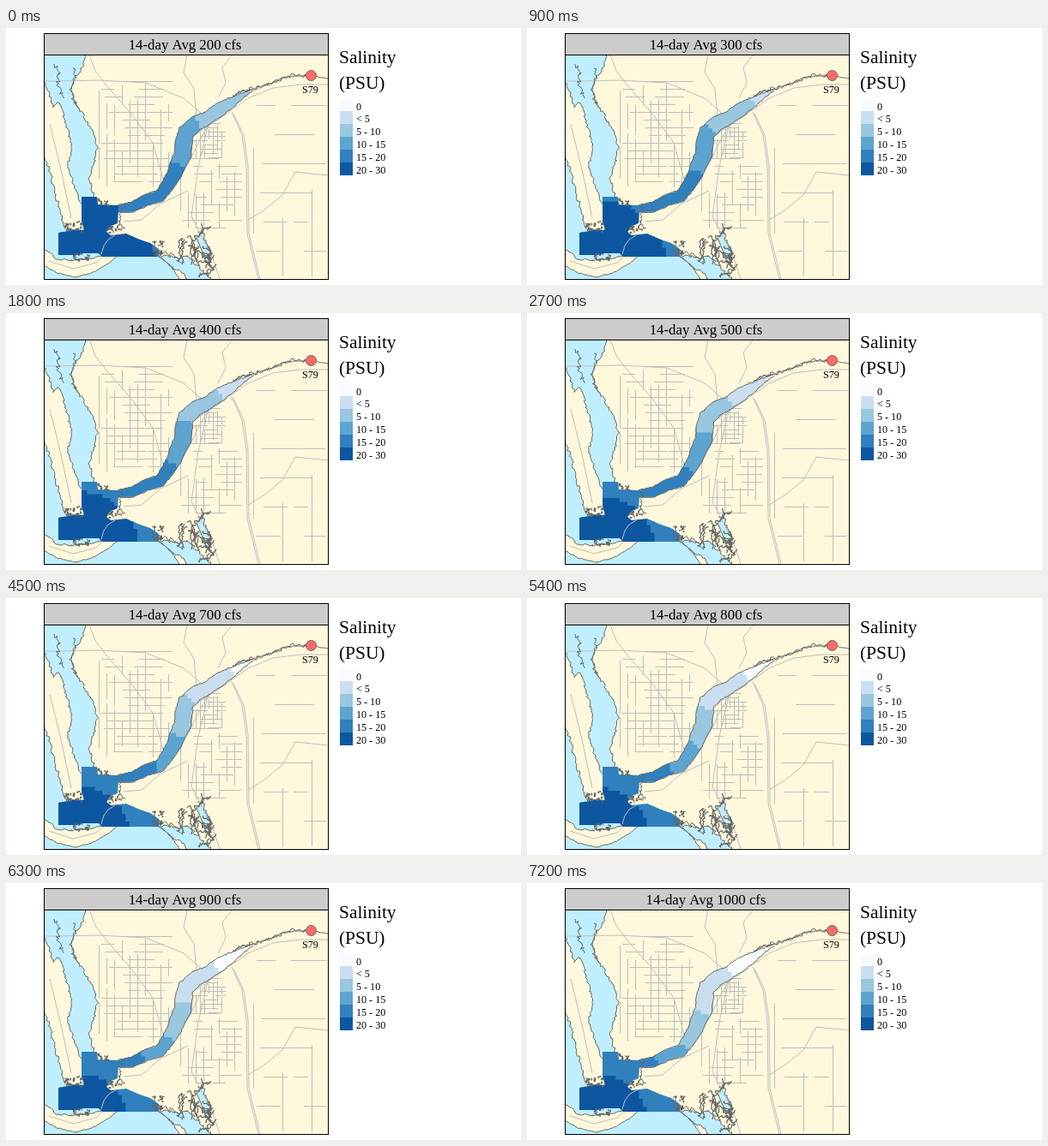
These frames come from a looping animation (600x300 px, 8 s). An HTML page with a canvas:

```html
<!DOCTYPE html>
<html lang="en">
<head>
<meta charset="utf-8">
<title>Salinity by flow</title>
<style>
html, body { margin: 0; width: 100%; height: 100%; overflow: hidden; background: #fff; }
canvas { display: block; }
</style>
</head>
<body>
<canvas id="stage" width="600" height="300"></canvas>
<script>
const ctx = document.getElementById('stage').getContext('2d');
const LAND = '#fff8dc', WATER = '#bfefff', EDGE = '#666', ROAD = '#bebebe';
const BLUES = ['#f7fbff', '#cadef0', '#98c7df', '#5da4d0', '#3080bd', '#0d57a1'];
const LABELS = ['0', '< 5', '5 - 10', '10 - 15', '15 - 20', '20 - 30'];
const STEP = 900, LOOP = 8000, CELL = 4.5;

const parse = s => s.split(' ').map(p => p.split(',').map(Number));

// River centre line: x, y, half width
const axis = parse('288,72,1 275,79,3 262,87,6 249,95,8 236,104,7.5 222,111,9 210,122,9.5 207,133,10 206,148,10 200,160,9.5 196,171,8.5 188,184,7.5 179,196,7 163,201,6.5 147,209,6 130,211,4');
const estuary = parse('88,197 106,197 107,206 131,207 130,228 122,231 117,238 122,242 140,240 156,247 168,251 178,258 178,267 112,267 108,263 88,263 86,265 61,265 61,239 78,236 91,236 88,225');

let seed;
function random(low = 0, high = 1) {
  seed = (seed * 16807) % 2147483647;
  return low + (high - low) * seed / 2147483647;
}

function trace(points, close) {
  ctx.beginPath();
  points.forEach(([x, y]) => ctx.lineTo(x, y));
  if (close) ctx.closePath();
}

function shape(points, fill, stroke, width = 1) {
  trace(points, !!fill);
  if (fill) { ctx.fillStyle = fill; ctx.fill(); }
  if (stroke) { ctx.strokeStyle = stroke; ctx.lineWidth = width; ctx.stroke(); }
}

function roughen(points, amount) {
  const out = [points[0]], wobble = () => random(-amount / 2, amount / 2);
  for (let i = 1; i < points.length; i++) {
    const [ax, ay] = points[i - 1], [bx, by] = points[i];
    const n = Math.ceil(Math.hypot(bx - ax, by - ay) / 2.5);
    for (let k = 1; k <= n; k++)
      out.push([ax + (bx - ax) * k / n + wobble(), ay + (by - ay) * k / n + wobble()]);
  }
  return out;
}

const coast = (s, amount, fill) => shape(roughen(parse(s), amount), fill, EDGE);
const road = s => shape(parse(s), null, ROAD);

function bank(side) {
  return axis.map(([x, y, half], i) => {
    const [ax, ay] = axis[Math.max(0, i - 1)], [bx, by] = axis[Math.min(axis.length - 1, i + 1)];
    const length = Math.hypot(bx - ax, by - ay);
    return [x - side * half * (by - ay) / length, y + side * half * (bx - ax) / length];
  });
}

function thicket(x, y, w, h) {
  ctx.fillStyle = EDGE;
  for (let i = 0; i < w * h / 9; i++)
    ctx.fillRect(x + random(0, w), y + random(0, h), random(1, 3), random(1, 3));
}

// Streets of random length on a loose grid
function streets(x, y, w, h, gap) {
  ctx.fillStyle = ROAD;
  const run = (size, draw) => {
    const from = random(0, size * .7);
    draw(Math.round(from), Math.round(random(.15, .6) * size));
  };
  for (let i = 0; i < w; i += gap)
    for (let n = 0; n < 2; n++)
      run(h, (from, length) => ctx.fillRect(Math.round(x + i), y + from, 1, Math.min(length, h - from)));
  for (let j = 0; j < h; j += gap)
    for (let n = 0; n < 2; n++)
      run(w, (from, length) => ctx.fillRect(x + from, Math.round(y + j), Math.min(length, w - from), 1));
}

// A winding creek with smaller branches
function creek(x, y, angle, length) {
  const points = [[x, y]];
  for (let i = 0; i < length; i += 2) {
    const turn = angle + random(-1.3, 1.3);
    points.push([x += 2 * Math.cos(turn), y += 2 * Math.sin(turn)]);
    if (length > 12 && random() < .2) creek(x, y, angle + random(-1.5, 1.5), length / 3);
  }
  shape(points, null, EDGE, 1.2);
}

function drawRoads() {
  streets(108, 62, 86, 124, 9);
  streets(216, 106, 40, 46, 5);
  streets(203, 152, 72, 82, 9);
  streets(288, 90, 86, 200, 34);
  road('97,31 104,50 118,68 146,100 171,134 184,180');
  road('44,62 60,62 108,61 163,64 207,82 229,101');
  road('211,31 207,52 219,71 222,104');
  road('263,32 252,46 256,64 247,82');
  road('218,126 247,107 282,82 311,70 343,66 375,66');
  road('184,180 202,174 213,157 225,132 236,113');
  road('236,111 224,162 216,220 241,269 249,293');
  road('263,98 275,125 280,160 281,240 294,293');
  road('265,100 277,125 282,160 283,240 296,293');
  road('282,224 300,213 322,195 337,168 375,172');
  road('137,226 158,224 180,205 212,190');
  road('51,112 64,165 76,222');
  road('50,272 78,281 105,274 128,252');
}

function drawWater() {
  coast('40,58 46,66 51,79 55,92 60,87 66,95 68,108 72,119 74,130 77,141 73,156 73,168 79,182 85,196 90,210 104,204 103,196 99,187 97,174 100,163 105,151 106,140 104,128 99,117 92,107 88,98 80,88 76,75 79,61 87,50 91,40 92,26 40,26', 3, WATER);
  coast('40,140 47,155 53,175 58,196 65,220 68,236 90,236 112,250 112,265 92,270 75,272 58,269 50,261 40,258', 3, WATER);
  coast('40,275 60,286 80,291 100,286 118,276 130,266 176,266 188,274 196,284 206,299 40,299', 1, WATER);
  coast('176,264 196,268 210,266 220,274 231,285 244,298 216,298 203,285 188,275', 4, WATER);
  coast('222,245 228,236 233,248 239,262 236,276 229,266', 4, WATER);
}

function drawMangroves() {
  coast('56,42 62,52 60,66 67,82', 5);
  coast('78,47 80,60 75,76 82,90', 5);
  coast('133,207 134,222 130,230 139,233', 6);
  coast('170,250 178,262 194,265 207,275', 6);
  thicket(67, 224, 20, 13);
  thicket(74, 263, 24, 8);
  thicket(106, 198, 14, 8);
  thicket(118, 230, 20, 8);
  thicket(170, 248, 12, 18);
  for (let x = 200; x < 244; x += 8) creek(x, 272 + (x - 200) / 4, -Math.PI / 2, 34);
  for (let y = 244; y < 290; y += 15) creek(224, y, random(-.6, .6), 20);
}

function along(x, y) {
  let best = Infinity, result = 0, travelled = 0;
  for (let i = 1; i < axis.length; i++) {
    const [ax, ay] = axis[i - 1], [bx, by] = axis[i];
    const dx = bx - ax, dy = by - ay, length = Math.hypot(dx, dy);
    const t = Math.max(0, Math.min(1, ((x - ax) * dx + (y - ay) * dy) / length ** 2));
    const gap = Math.hypot(x - ax - t * dx, y - ay - t * dy);
    if (gap < best) { best = gap; result = travelled + t * length; }
    travelled += length;
  }
  return result;
}

function fillCells(points, classify) {
  ctx.save();
  trace(points, true);
  ctx.clip();
  const xs = points.map(p => p[0]), ys = points.map(p => p[1]);
  const snap = v => Math.floor(v / CELL) * CELL;
  for (let x = snap(Math.min(...xs)); x < Math.max(...xs); x += CELL)
    for (let y = snap(Math.min(...ys)); y < Math.max(...ys); y += CELL) {
      ctx.fillStyle = BLUES[classify(x + CELL / 2, y + CELL / 2)];
      ctx.fillRect(x, y, CELL + .5, CELL + .5);
    }
  ctx.restore();
}

// Fresh water pushes the class limits downstream as the flow grows
function drawSalinity(step) {
  const limits = [10.5 * step - 24, 6 + 22.4 * step ** .8, 74 + 11.8 * step, 131 + 9.3 * step];
  const saltRadius = 54 + 36 * Math.exp(-.37 * step);
  const left = bank(1), right = bank(-1);
  fillCells([...left, ...right.slice().reverse()], (x, y) => {
    const distance = along(x, y);
    return limits.filter(limit => distance >= limit).length;
  });
  fillCells(estuary, (x, y) => Math.hypot(x - 85, y - 280) < saltRadius ? 5 : 4);
  shape(roughen(left, 1.5), null, EDGE);
  shape(roughen(right, 1.5), null, EDGE);
}

function text(string, x, y, size, align = 'left') {
  ctx.font = size + 'px "Liberation Serif", "Times New Roman", serif';
  ctx.textAlign = align;
  ctx.fillStyle = '#000';
  ctx.fillText(string, x, y);
}

function box(x, y, w, h, fill) {
  if (fill) { ctx.fillStyle = fill; ctx.fillRect(x, y, w, h); }
  ctx.strokeStyle = '#000';
  ctx.lineWidth = 1;
  ctx.strokeRect(x, y, w, h);
}

function drawLegend() {
  const rowTop = i => Math.floor(83 + i * 14.84);
  text('Salinity', 388, 41, 21.4);
  text('(PSU)', 388, 71, 21.4);
  LABELS.forEach((label, i) => {
    ctx.fillStyle = BLUES[i];
    ctx.fillRect(389, rowTop(i), 15, rowTop(i + 1) - rowTop(i));
    text(label, 408, rowTop(i) + 13, 12.1);
  });
}

function drawGauge() {
  for (const amount of [3, 5])
    coast('264,79 279,73 295,69 305,66 319,60 333,55 350,55', amount);
  coast('358,56 366,58 376,59', 1);
  ctx.beginPath();
  ctx.arc(355.5, 55.5, 6, 0, 7);
  ctx.fillStyle = '#ff6a6a';
  ctx.fill();
  ctx.stroke();
  text('S79', 354.5, 76, 12.1, 'center');
}

function draw(step) {
  seed = 4711;
  ctx.fillStyle = '#fff';
  ctx.fillRect(0, 0, 600, 300);
  ctx.save();
  ctx.beginPath();
  ctx.rect(44.5, 31.5, 331, 262);
  ctx.clip();
  ctx.fillStyle = LAND;
  ctx.fillRect(44, 31, 332, 263);
  drawWater();
  drawRoads();
  drawSalinity(step);
  drawMangroves();
  road('111,264 114,254 119,247 127,242');
  drawGauge();
  ctx.restore();
  box(44.5, 31.5, 331, 262);
  box(44.5, 6.5, 331, 25, '#ccc');
  text(`14-day Avg ${200 + step * 100} cfs`, 208.5, 25, 16.8, 'center');
  drawLegend();
}

let shown = -1;
function tick() {
  const step = Math.floor(performance.now() % LOOP / STEP);
  if (step !== shown) draw(shown = step);
  requestAnimationFrame(tick);
}
tick();
</script>
</body>
</html>
```
